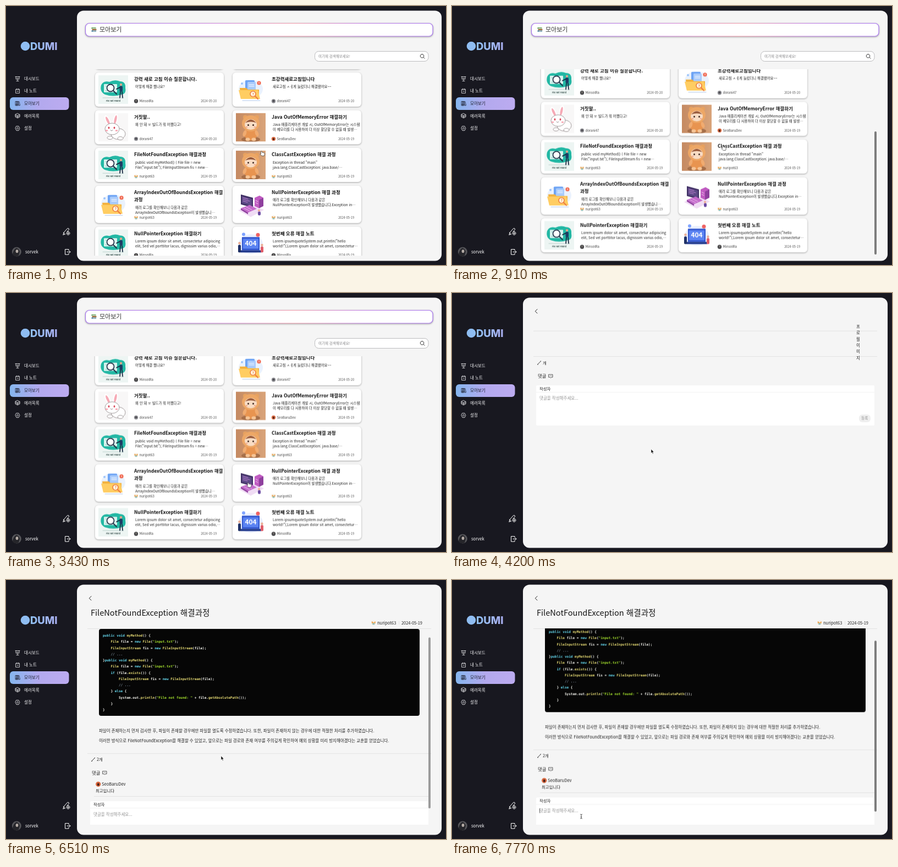
Recreate the animation shown at these times as an HTML page. Size 800x471 px, loop 8 s.

```html
<!DOCTYPE html>
<html lang="ko">
<head>
<meta charset="utf-8">
<title>모아보기</title>
<style>
  html, body { margin: 0; width: 100%; height: 100%; overflow: hidden; background: #181820; }
  #stage { display: block; width: 800px; height: 471px; }
  text { font-family: "Noto Sans CJK KR", "Noto Sans", sans-serif; white-space: pre; }
  .code text { font-family: "DejaVu Sans Mono", "Noto Sans Mono", monospace; }
  .card { filter: drop-shadow(0 1px 1.6px #0005); }
  .line { fill: none; stroke-linecap: round; stroke-linejoin: round; }
</style>
</head>
<body>
<svg id="stage" viewBox="0 0 800 471"></svg>
<script>
const LOOP = 8000;
const $ = id => document.getElementById(id);

// Drawing helpers
const text = (x, y, s, size, fill = '#222', weight = 400, more = '') =>
  `<text x="${x}" y="${y}" font-size="${size}" fill="${fill}" font-weight="${weight}" ${more}>${s}</text>`;
const rect = (x, y, w, h, fill, r = 0, more = '') =>
  `<rect x="${x}" y="${y}" width="${w}" height="${h}" rx="${r}" fill="${fill}" ${more}/>`;
const circle = (x, y, r, fill, more = '') => `<circle cx="${x}" cy="${y}" r="${r}" fill="${fill}" ${more}/>`;
const oval = (x, y, rx, ry, fill, turn = 0) =>
  `<ellipse rx="${rx}" ry="${ry}" fill="${fill}" transform="translate(${x} ${y}) rotate(${turn})"/>`;
const shape = (d, fill) => `<path d="${d}" fill="${fill}"/>`;
const line = (d, color, w = 0.9) => `<path class="line" d="${d}" stroke="${color}" stroke-width="${w}"/>`;
const group = (id, body, more = '') => `<g id="${id}" ${more}>${body}</g>`;
const view = (x, y, w, h, body) =>
  `<svg x="${x}" y="${y}" width="${w}" height="${h}" viewBox="${x} ${y} ${w} ${h}">${body}</svg>`;
const gradient = (id, ...colors) => `<linearGradient id="${id}">${colors.map((c, i) =>
  `<stop offset="${i / (colors.length - 1)}" stop-color="${c}"/>`).join('')}</linearGradient>`;

const users = {
  minsol: 'MinsolRa', dorani: 'dorani47', baru: 'SeoBaruDev', nuri: 'nuripot63'
};
const avatar = (who, x, y, r) => ({
  minsol: circle(x, y, r, '#4a4a4c') + circle(x, y - r * .2, r * .4, '#77726e'),
  dorani: circle(x, y, r, '#8b8b90') + circle(x, y - r * .1, r * .5, '#4b4a50'),
  baru: circle(x, y, r, '#d9683f') + oval(x, y + r * .1, r * .4, r * .55, '#3d1d17'),
  nuri: circle(x, y, r, '#f4ede2') + shape(`M${x - r * .8} ${y - r * .8}l${r * .7} ${r * .6}h${r * .3}l${r * .6} ${-r * .6}v${r}h${-r * 1.6}z`, '#eda24d') +
    rect(x - r * .5, y + r * .1, r, r * .7, '#8fc1bd', 1)
})[who];

// Card pictures, 54 x 52
const pictures = {
  search: rect(0, 0, 54, 52, '#edf5f3') +
    shape('M5 18Q9 9 20 12Q30 7 39 11Q50 11 49 23Q51 34 42 35Q27 40 12 35Q2 30 5 18z', '#22b8a4') +
    rect(10, 16, 24, 15, '#d8f3ee', 1) + line('M13 20h14M13 28h12', '#84c9c1', 1) +
    circle(22, 23, 6.5, '#fff', 'stroke="#25364c" stroke-width="1.8"') + line('M27 28l6 6', '#25364c', 2.2) +
    circle(41, 17, 2.2, '#e6a48b') + rect(38.5, 19.5, 5.5, 10, '#1f3d66', 2) +
    line('M40 30l-1 11M43 30l1 11M39 22l-6 3', '#16263f', 1.8) + line('M8 41h38', '#9bb7b3', .6) +
    text(27, 47.5, 'File Not Found', 3.6, '#38504d', 700, 'text-anchor="middle"'),
  folder: rect(0, 0, 54, 52, '#fff') + oval(27, 25, 22, 17, '#eaf2fe') +
    rect(17, 9, 17, 22, '#6ea4f4', 1.5) + rect(21, 12, 15, 20, '#a9cbfb', 1.5) + line('M24 17h9M24 20h9', '#fff', 1) +
    shape('M7 23h12l3 3h20v17H9z', '#f3b13d') + shape('M5 27h35l4 16H9z', '#ffcd62') +
    circle(31, 34, 5, '#fff6df', 'stroke="#ee7d43" stroke-width="1.6"') + text(29.4, 36.8, '?', 7, '#ee7d43', 700) +
    line('M35 38l5 5', '#ee7d43', 2.2) + circle(42, 14, 3.6, '#f16a52') + rect(41.6, 12, .9, 3.3, '#fff') +
    circle(11, 15, 2, '#9cc4fa') + line('M12 46h32', '#9db9e6', .8),
  rabbit: rect(0, 0, 54, 52, '#f8f7f7') +
    oval(17, 14, 4.2, 11, '#fff', -25) + oval(17, 14, 2.2, 8, '#f6a9b5', -25) +
    oval(31, 12, 4.2, 11, '#fff', 12) + oval(31, 12, 2.2, 8, '#f6a9b5', 12) +
    `<g stroke="#65595c" stroke-width=".6">${oval(36, 38, 13, 10, '#fff') + oval(25, 29, 13, 10.5, '#fff') +
      oval(21, 45, 5, 3, '#fff') + oval(40, 46, 5, 3, '#fff')}</g>` +
    oval(19, 27, 1.4, 2, '#d84153') + oval(29, 27, 1.4, 2, '#d84153') +
    oval(15, 32, 2.4, 1.5, '#f8a8b4') + oval(33, 32, 2.4, 1.5, '#f8a8b4') + line('M22 31l2 1.5l2-1.5', '#65595c', .7),
  doll: rect(0, 0, 54, 52, 'url(#clay)') + oval(27, 48, 17, 5, '#a66f49') +
    circle(17, 8, 4, '#e7a15f') + circle(38, 8, 4, '#e7a15f') +
    oval(27, 37, 12, 13, '#e89450') + oval(27, 19, 16, 14.5, '#eda766') +
    oval(27, 21, 11, 9.5, '#f8dcc4') + shape('M17 18Q27 6 37 18Q27 14 17 18z', '#98593a') +
    circle(22.5, 22, 1.5, '#3a241d') + circle(31.5, 22, 1.5, '#3a241d') +
    oval(19.5, 25.5, 2, 1.2, '#f0a68c') + oval(34.5, 25.5, 2, 1.2, '#f0a68c') +
    oval(16, 37, 3, 6, '#f0ab70', 20) + oval(38, 37, 3, 6, '#f0ab70', -20) +
    oval(21.5, 48, 4, 3, '#f6c495') + oval(32.5, 48, 4, 3, '#f6c495'),
  server: rect(0, 0, 54, 52, '#fff') + shape('M4 37L28 25L51 36L27 49z', '#f0dcf4') +
    shape('M9 8L31 14V32L9 26z', '#3f2f63') + shape('M11 11L29 16V29L11 24z', '#5d4a86') +
    line('M13 14l9 2.4M13 17l12 3.2M13 20l8 2.2', '#d18be0', .9) +
    shape('M34 14L43 10L50 14V29L42 33L34 29z', '#c05bc1') + shape('M42 18L50 14V29L42 33z', '#8f3f9e') +
    line('M36 19l4 2M36 23l4 2', '#f2c4f1', 1) +
    shape('M9 33L25 27L38 34L22 41z', '#c46bcb') + shape('M9 33L22 41V44L9 36z', '#8f3f9e') +
    line('M15 33l10 5M19 31l10 5', '#edb9ef', 1) + circle(42, 37, 2, '#efac91') + rect(40, 39, 5, 7, '#6b4aa2', 2),
  laptop: rect(0, 0, 54, 52, '#fff') + oval(27, 27, 22, 18, '#e9effe') +
    shape('M11 14H43V38H11z', '#3357ce') + rect(13, 17, 28, 18, '#5b83f2', 1) +
    text(27, 30, '404', 12, '#fff', 700, 'text-anchor="middle"') + rect(7, 38, 40, 4, '#233b8d', 1.5) +
    circle(14, 9, 3, '#7fa3ff') + circle(40, 10, 3.5, '#ef6262') + rect(4, 28, 5, 14, '#203166', 2) +
    circle(6.5, 25, 2.3, '#ebae94') + rect(45, 31, 5, 11, '#e15d69', 2) + circle(47.5, 28.5, 2.2, '#ebae94')
};

const lorem = ['Lorem ipsum dolor sit amet, consectetur adipiscing', 'elit, Sed vel porttitor lacus, dignissim varius odio,⋯'];
const notes = [
  ['search', ['강력 새로 고침 이슈 질문합니다.'], ['어떻게 해결 했나요?'], 'minsol', 20],
  ['folder', ['초강력새로고침입니다'], ['새로고침 ㅅㅔ게 눌렀더니 해결됐어요~~'], 'dorani', 20],
  ['rabbit', ['거짓말..'], ['왜 안 돼 ㅠ 빌드가 뭐 어쨌다고!'], 'dorani', 20],
  ['doll', ['Java OutOfMemoryError 해결하기'], ['Java 애플리케이션 개발 시, OutOfMemoryError는 시스템', '이 메모리를 다 사용하여 더 이상 할당할 수 없을 때 발생⋯'], 'baru', 19],
  ['search', ['FileNotFoundException 해결과정'], ['public void myMethod() { File file = new', 'File("input.txt"); FileInputStream fis = new⋯'], 'nuri', 19],
  ['doll', ['ClassCastException 해결 과정'], ['Exception in thread "main"', 'java.lang.ClassCastException: java.base/⋯'], 'nuri', 19],
  ['folder', ['ArrayIndexOutOfBoundsException 해결', '과정'], ['에러 로그를 확인해보니 다음과 같은', 'ArrayIndexOutOfBoundsException이 발생했습니⋯'], 'nuri', 19],
  ['server', ['NullPointerException 해결 과정'], ['에러 로그를 확인해보니 다음과 같은', 'NullPointerException이 발생했습니다.Exception in⋯'], 'nuri', 19],
  ['search', ['NullPointerException 해결하기'], lorem, 'minsol', 19],
  ['laptop', ['첫번째 오류 해결 노트'], ['Lorem ipsumquoteSystem.out.println("hello', 'world!");Lorem ipsum dolor sit amet, consectetur⋯'], 'minsol', 19]
];
const rowTops = [121, 189.6, 258.1, 326.7, 401.2];

function card([pic, title, body, who, day], i) {
  const x = 162 + i % 2 * 250, row = i >> 1, y = rowTops[row], h = row === 3 ? 68 : 62;
  const bodyY = y + 28.4 + (title.length - 1) * 13.4, foot = y + h - 10;
  return rect(x, y, 234, h, '#fff', 6, 'class="card"') +
    `<svg x="${x + 6}" y="${y + h / 2 - 26}" width="54" height="52">${pictures[pic]}</svg>` +
    title.map((s, k) => text(x + 71, y + 15.3 + k * 13.4, s, 8.5, '#111', 700)).join('') +
    body.map((s, k) => text(x + 73, bodyY + k * 9.3, s, 6.4, '#222')).join('') +
    avatar(who, x + 74.5, foot, 3.7) + text(x + 80.5, foot + 2.1, users[who], 6, '#444') +
    text(x + 221, foot + 2, '2024-05-' + day, 5.6, '#555', 400, 'text-anchor="end"');
}

const menu = ['대시보드', '내 노트', '모아보기', '에러목록', '설정'];
const icons = [
  'M17 128.5h8M18 128.5v4.5h6v-4.5M21 133v3M19 136.5h4M20 131h2',
  'M18 151.5h6.5v7h-6.5zM19.7 150.3v2M22.8 150.3v2M20 155h2.5',
  'M17.5 173.5h2.2v7.5h-2.2zM19.7 173.5h2.2v7.5h-2.2zM22 174l1.8-.4l1.7 7l-1.8.4zM17.5 179h4.4',
  'M21 195.5l4 2v4.3l-4 2l-4-2v-4.3zM17 197.5l4 2l4-2M21 199.5v4M17 199.8l4 2l4-2',
  'M19 218.5h4l2 4l-2 4h-4l-2-4zM21 220.9a1.6 1.6 0 1 0 .01 0'
];
const sidebar = circle(35, 73, 8.3, '#8fbdf2') + text(44, 80, 'DUMI', 18.5, 'url(#logo)', 800, 'style="font-family:Inter,sans-serif"') +
  rect(7, 166, 107.5, 23, 'url(#active)', 6) +
  menu.map((s, i) => {
    const color = i === 2 ? '#1b1c2a' : '#f2f2f4', y = 131.8 + i * 22.7;
    return line(icons[i], color, .8) + text(33, y + 2.7, s, 7.5, color, 500);
  }).join('') +
  line('M104 416l1-4l6.5-7.3q1.5-1 2.5 0t0 2.5l-3 3.3M104 416l3.5-1M104.5 412l2.5 2.6M113 410.2a3 3 0 1 0 .01 0M113 411.8v3M111.5 413.3h3', '#fff', 1) +
  circle(19.3, 447, 8.5, '#56565a') + shape('M12 451q2-9 7-11q5 2 6 7l-2 7q-6 3-10-1z', '#25252a') + oval(20, 446, 2.4, 3, '#b5aca6') +
  text(35, 449.6, 'sorvek', 7.6, '#fff', 500) +
  line('M114 444.5v-2h-6.5v9.5h6.5v-2M111 447.2h6M115 445.2l2 2l-2 2', '#fff', 1);

const list = rect(144.5, 31.5, 631.5, 23.5, '#fff', 7, 'stroke="url(#frame)" stroke-width="1.2" class="card"') +
  rect(155.5, 39, 8, 2.6, '#5b9a55', .6) + rect(156.5, 41.8, 8, 2.4, '#a5713f', .6) + rect(155.5, 44.3, 8.5, 2.5, '#497fa1', .6) +
  rect(157, 40, 6, .8, '#e9ead7') + rect(158, 45, 5.5, .8, '#e9ead7') +
  text(170, 46.8, '모아보기', 11, '#333', 500) +
  rect(561.5, 82.5, 206.5, 18, '#fff', 7, 'stroke="#b4b4b6" stroke-width=".9"') +
  text(568, 94, '여기에 검색해보세요!', 6.5, '#8a8a8c') +
  line('M756.5 87.6a3.3 3.3 0 1 0 .01 0M759 93.4l2 2', '#333', 1) +
  view(130, 115, 650, 339, group('cards', [162, 412].map(x => rect(x, 52.4, 234, 62, '#fff', 6, 'class="card"')).join('') +
    notes.map(card).join(''))) +
  rect(768, 228, 4, 224, '#7d7d7d', 2, 'id="listBar"');

const back = line('M155 29.5l-3.7 3.7l3.7 3.7', '#222', 1);
const rule = (y, x = 148, end = 773) => rect(x, y, end - x, .8, '#dedede');
const counter = (y, s) => line(`M156 ${y + 2.5}l5-5M155.4 ${y + 3}h1M161 ${y - 3}h.6`, '#333', 1) + text(165, y + 2.7, s, 7.3, '#222');
const heading = y => text(156, y + 3, '댓글', 8.4, '#222', 500) +
  line(`M176 ${y - 2.8}h7v5h-2.3l-1.2 1.4l-1.2-1.4h-2.3zM177.9 ${y - .3}h.1M179.5 ${y - .3}h.1M181.1 ${y - .3}h.1`, '#333', .8);
const editor = (y, caret = '') => rect(153, y, 615, 73, '#fff', 2) + rect(153, y + 12.2, 615, .7, '#ececec') +
  text(159, y + 9, '작성자', 7.4) + text(159, y + 26.4, '댓글을 작성해주세요...', 7.5, '#949494') + caret +
  rect(740, y + 53, 21, 14, '#efefef', 6) + text(744.2, y + 62.3, '등록', 6.5, '#8c8c8c');

const empty = back + rule(68.7) + rule(115.2) +
  [...'프로필이미지'].map((c, i) => text(735, 64 + i * 11.3, c, 7.5)).join('') +
  counter(127, '개') + heading(151) + editor(168);

const paint = s => s.replace(/(\/\/.*)|("[^"]*")|\b(public|void|new|if|else)\b|\b(File(?:InputStream)?(?= fi|\()|\w+(?=\())/g,
  (m, note, str, key) => `<tspan fill="${note ? '#8292a2' : str ? '#a6e22e' : key ? '#66d9ef' : '#e6db74'}">${m}</tspan>`);
const code = `public void myMethod() {
    File file = new File("input.txt");
    FileInputStream fis = new FileInputStream(file);
    // ...
}public void myMethod() {
    File file = new File("input.txt");
    if (file.exists()) {
        FileInputStream fis = new FileInputStream(file);
        // ...
    } else {
        System.out.println("File not found: " + file.getAbsolutePath());
    }
}`.split('\n');

const article = rect(169, 107, 583, 158, '#060606', 4) +
  `<g class="code">${code.map((s, i) => text(176, 121.2 + i * 11.25, paint(s), 6.03, '#f8f8f2', 700)).join('')}</g>` +
  text(169, 295.3, '파일이 존재하는지 먼저 검사한 후, 파일이 존재할 경우에만 파일을 열도록 수정하였습니다. 또한, 파일이 존재하지 않는 경우에 대한 적절한 처리를 추가하였습니다.', 7.46) +
  text(169, 312.5, '이러한 방식으로 FileNotFoundException을 해결할 수 있었고, 앞으로는 파일 경로와 존재 여부를 주의깊게 확인하여 예외 상황을 미리 방지해야겠다는 교훈을 얻었습니다.', 7.46) +
  rule(333.3) + counter(344.5, '2개') + heading(368.5) +
  avatar('baru', 167.7, 389.3, 4.6) + text(174, 392.2, users.baru, 7.6) + text(163, 403.7, '최고입니다', 7.4) +
  rule(411, 160, 768) + editor(420.3, rect(159, 440, .7, 8.5, '#222', 0, 'id="caret"'));

const detail = back + text(154, 64.5, 'FileNotFoundException 해결과정', 14.6, '#161616', 500) +
  avatar('nuri', 668.3, 78, 4.2) + text(675, 80.7, users.nuri, 7.5) + rect(714.5, 75, .6, 6, '#d4d4d4') +
  text(719, 80.7, '2024-05-19', 7.4) + rule(88) +
  view(130, 88.8, 650, 356.2, group('article', article)) +
  rect(768, 88.5, 4, 311, '#7d7d7d', 2, 'id="pageBar"');

const cursor = group('hand', `<path d="M-2.6-3.6q.9-1 1.7 0l1 2.4q.8-.8 1.4 0q.8-.6 1.3.2q1-.3 1.2.6l.3 2.4l-1 2.6h-4l-3-2.8q-.2-1.2 1.2-.8z" fill="#fff" stroke="#333" stroke-width=".7"/>`) +
  group('arrow', `<path d="M0-4v7.2l1.7-1.5l1.2 2.7l1.2-.5l-1.2-2.6h2.2z" fill="#111" stroke="#fff" stroke-width=".5"/>`) +
  group('beam', line('M-1.6-4q1.6 0 1.6 1v6q0 1 1.6 1M1.6-4q-1.6 0-1.6 1M-1.6 4q1.6 0 1.6-1M-.8.8h1.6', '#333', .8));

$('stage').innerHTML = `<defs>${gradient('active', '#86b6ee', '#b3a9ee', '#bcabf0') + gradient('logo', '#8fc0f4', '#aab0f2') +
  gradient('frame', '#a673ee', '#b57bea', '#d589dc', '#f29ba9', '#c07fe6', '#a673ee') + gradient('clay', '#c58a62', '#d9a47a')}</defs>` +
  rect(0, 0, 800, 471, '#181820') + rect(129, 8.5, 663, 455, '#f5f5f5', 12) + sidebar +
  group('list', list) + group('empty', empty) + group('detail', detail) + group('cursor', cursor);

// Motion: tables of [ms, value]
function play(id, prop, steps, easing = 'linear') {
  const all = [...steps, [LOOP, steps[steps.length - 1][1]]];
  $(id).animate(all.map(([t, v]) => ({ offset: t / LOOP, [prop]: v, easing })), { duration: LOOP, iterations: Infinity });
}
const show = (id, from, to = LOOP) => play(id, 'opacity',
  [...(from ? [[0, 0]] : []), [from, 1], ...(to < LOOP ? [[to, 0]] : [])], 'step-end');
const slide = (id, steps, k = 1) => play(id, 'transform', steps.map(([t, y]) => [t, `translate(0px, ${y * k}px)`]));

show('list', 0, 3920);
show('empty', 3920, 4270);
show('detail', 4270);
show('hand', 0, 3920);
show('arrow', 3920, 7420);
show('beam', 7420);
show('caret', 7560);

const listScroll = [[0, 0], [560, 0], [630, -6], [700, -12], [840, -15.3]];
slide('cards', listScroll);
slide('listBar', listScroll.map(([t, y]) => [t, -15.3 - y]), .66);
play('listBar', 'opacity', [[0, 0], [560, 0], [600, 1], [1050, 1], [1330, 0]]);

const pageScroll = [[0, 0], [5040, 0], [5250, -19.7], [5530, -22], [6020, -22], [6230, -18], [7000, -18], [7400, -24.7]];
slide('article', pageScroll);
slide('pageBar', pageScroll, -.88);
play('pageBar', 'opacity', [[0, 0], [5040, 0], [5110, 1], [6440, 1], [6720, 0], [6930, 0], [7000, 1]]);

play('cursor', 'transform', [
  [0, 466, 268], [70, 466, 268], [420, 494, 258], [1750, 494, 258], [2310, 543, 343], [2590, 543, 343],
  [3010, 506, 398], [3150, 506, 398], [3780, 362, 288], [4270, 362, 288], [4830, 391, 324],
  [6860, 391, 324], [7490, 235, 430]
].map(([t, x, y]) => [t, `translate(${x}px, ${y}px)`]));
</script>
</body>
</html>
```
